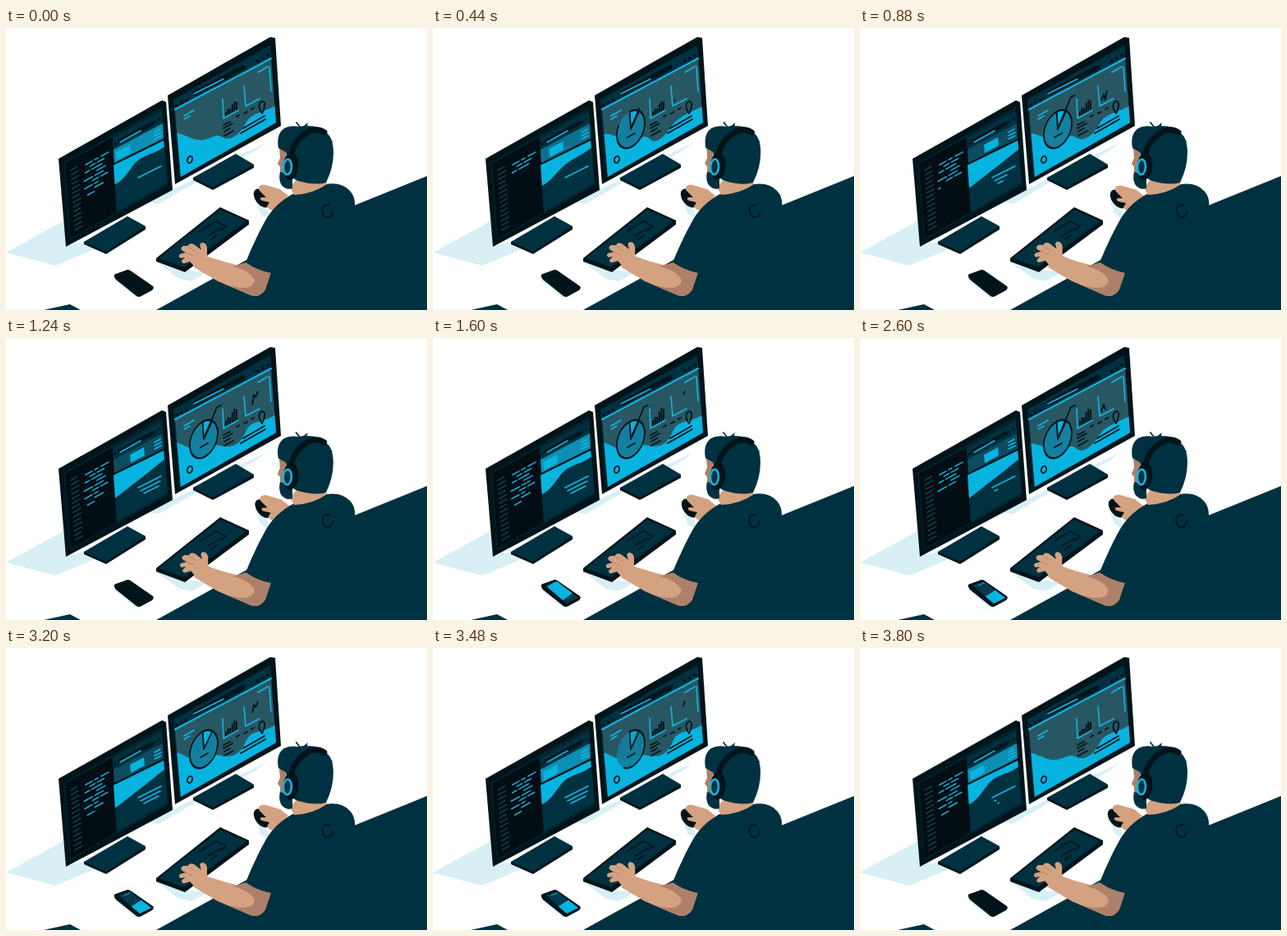
Recreate the animation shown at these times as an HTML page. Size 513x343 px, loop 3840 ms.

```html
<!DOCTYPE html>
<html lang="en">
<head>
<meta charset="utf-8">
<title>Desk scene</title>
<style>
html, body { margin: 0; width: 100%; height: 100%; overflow: hidden; background: #fff; }
svg { display: block; width: 100vw; height: 100vh; }
.navy { fill: #003140; }
.dark { fill: #01141a; }
.slate { fill: #285764; }
.cyan { fill: #07b3df; }
.pale { fill: #d7eff5; }
.skin { fill: #d4a281; }
.shade { fill: #ae806a; }
.ln { fill: none; stroke: #02161d; stroke-width: 1.8; stroke-linecap: round; stroke-linejoin: round; }
.lc { stroke: #12b4e0; stroke-width: 1.6; }
</style>
</head>
<body>
<svg viewBox="0 0 513 343" preserveAspectRatio="none">
  <defs>
    <clipPath id="webClip"><path d="M131 166L192 136L197 188L135 224Z"/></clipPath>
    <clipPath id="dashClip"><path d="M206 99L323 37L329 115L213 181Z"/></clipPath>
    <clipPath id="phoneClip"><path d="M137 301L151 296L177 316L163 323Z"/></clipPath>
  </defs>

  <!-- desk and shadows -->
  <path class="pale" d="M0 273L70 235L76 264L96 260L108 269L60 289ZM174 212L206 195L229 184L233 187L186 214ZM282 156L316 140L304 149L288 158ZM305 212L319 222L320 233L310 226ZM180 282L216 294L246 297L226 308L211 305ZM131 306L137 303L167 325L158 328Z"/>
  <path class="navy" d="M513 180L424 216L315 270L183 343H513ZM46 343L78 336L91 343Z"/>

  <!-- left monitor -->
  <path class="dark" d="M95 260V263L122 275L170 245V241Z"/>
  <path class="navy" d="M95 260L148 229L170 241L122 272Z"/>
  <path class="dark" d="M64 159L190 88L195 90L203 197L73 266Z"/>
  <path fill="#05222c" d="M70 164L190 96L197 191L78 258Z"/>
  <path fill="#020e13" d="M72 165L130 133L135 224L79 256Z"/>
  <path class="navy" d="M130 134L190 101L191 116L131 148Z"/>
  <path class="ln" style="stroke-width:5" d="M138 138L178 116"/>
  <path class="ln lc" d="M139 139L164 125"/>
  <g class="dark"><circle cx="133" cy="141" r="1.5"/><circle cx="182" cy="114" r="1.5"/><circle cx="187" cy="111" r="1.5"/></g>
  <path fill="#0d4b60" d="M131 148L191 116L192 134L132 164Z"/>
  <path id="hero" fill="#0b8fb4" d="M131 148L191 116L192 134L132 164Z"/>
  <path id="card" class="cyan" d="M134 151L151 142L152 152L135 161Z"/>
  <path class="ln lc" d="M181 127L188 123M181 131L189 127M181 135L189 131"/>
  <g clip-path="url(#webClip)">
    <path class="navy" d="M130 130H200V226H130Z"/>
    <path id="webWave" class="cyan"/>
    <g id="webText" class="ln lc"></g>
  </g>
  <path class="ln" d="M131 166L192 136"/>
  <g id="side" transform="matrix(1 -.55 .07 1 79 173)" class="ln" style="stroke:#194450;stroke-width:1.5"></g>
  <g id="code" transform="matrix(1 -.55 .07 1 94 168)" class="ln lc"></g>

  <!-- right monitor -->
  <path class="dark" d="M228 182V185L252 197L302 170V166Z"/>
  <path class="navy" d="M228 182L280 153L302 166L252 194Z"/>
  <path class="dark" d="M197 82L322 11L328 12L335 119L206 190Z"/>
  <path class="navy" d="M204 87L322 21L329 116L212 182Z"/>
  <path class="slate" d="M206 99L323 37L329 115L213 181Z"/>
  <path class="ln" style="stroke-width:6" d="M231 79L289 48"/>
  <path class="ln lc" d="M229 80L265 62"/>
  <g class="dark"><circle cx="208" cy="94" r="2"/><circle cx="214" cy="91" r="2"/><circle cx="220" cy="88" r="2"/><circle cx="307" cy="40" r="2"/><circle cx="313" cy="37" r="2"/><circle cx="319" cy="33" r="2"/></g>
  <g clip-path="url(#dashClip)"><path id="wave" class="cyan"/></g>
  <path class="ln lc" style="stroke-width:2" d="M206 99L323 37"/>
  <path class="ln lc" d="M217 107L229 100M217 111L224 107M307 54L319 47"/>
  <path class="ln lc" d="M264 86L265 110L283 100M290 71L292 95L309 86M321 47L323 77"/>
  <g id="bars" class="ln" style="stroke-width:2;stroke-linecap:butt"></g>
  <path id="trace" class="ln" d="M294 89L297 81L299 87L302 69L304 72L307 65" stroke-dasharray="24 200"/>
  <path class="ln" d="M265 118L273 114M265 122L276 116M266 126L273 122M266 131L277 125M281 108L284 106M290 104L294 102M299 99L302 97M286 128L316 111M289 122L315 107"/>
  <path class="ln" d="M312 104Q307 97 309 92Q312 87 315 91Q316 96 312 104Z"/>
  <ellipse class="ln" cx="224" cy="160" rx="3" ry="4.2" transform="rotate(20 224 160)"/>
  <g id="pie">
    <g transform="matrix(1 -.54 .08 1.25 241 123)">
      <circle r="17" fill="#147f9f"/>
      <path id="slice" class="cyan"/>
      <circle id="ring" class="ln" r="17" pathLength="100" stroke-dasharray="100" transform="rotate(-90)"/>
      <path class="ln" d="M0 -17V0L11 -12"/>
    </g>
    <path class="ln" d="M237 133L246 128"/>
  </g>
  <path id="pointer" class="ln" d="M241 122L257 84L262 82" pathLength="100"/>

  <!-- keyboard and phone -->
  <path class="dark" d="M183 280L261 218L296 234V239L218 297L183 284Z"/>
  <path class="navy" d="M186 280L261 221L293 235L217 291Z"/>
  <path class="ln" d="M237 247L256 235L268 241L262 246M246 253L261 244M250 257L257 252"/>
  <path class="dark" d="M132 302Q131 300 134 299L148 294Q151 294 153 296L179 314Q181 316 178 319L165 326Q162 328 159 326L134 306Q132 304 132 302Z"/>
  <g id="phone" clip-path="url(#phoneClip)">
    <path fill="#04384a" d="M136 294H180V326H136Z"/>
    <path id="page" class="cyan" d="M124 304L146 290L164 306L146 319Z"/>
    <path class="ln lc" style="stroke-width:1" d="M144 301L151 298"/>
  </g>

  <!-- person -->
  <g id="mouse">
    <ellipse class="dark" cx="312" cy="207" rx="8" ry="13" transform="rotate(-38 312 207)"/>
    <path class="skin" d="M309 192Q313 189 320 192L334 196L344 204L326 222Q319 221 318 217L321 212L312 210Q308 208 311 206L317 206L311 200Q306 196 309 192Z"/>
  </g>
  <g id="arm">
    <path class="skin" d="M239 276L265 284L292 291L323 297L317 317Q309 329 298 325L258 308L229 291Z"/>
    <path class="shade" d="M276 290L293 285L323 297L317 317Q309 329 298 325L268 312Q300 322 303 307Q298 295 276 290Z"/>
    <g id="hand">
      <path class="skin" d="M245 278L245 267Q244 261 239 261Q235 262 237 267L238 270L229 263Q223 261 222 265L216 265Q211 268 215 271L219 273L212 275Q209 278 213 280L218 279L214 283Q214 287 218 286L224 284L231 292L243 295L253 282Z"/>
      <path class="ln" style="stroke:#ae806a;stroke-width:.8" d="M223 267L231 272M219 273L228 277"/>
    </g>
  </g>
  <g id="body">
    <path class="navy" d="M351 201Q370 203 390 190Q409 187 419 198Q426 205 425 218L420 330L312 330L323 298Q306 295 292 285Q303 258 314 238Q326 214 351 201Z"/>
    <path class="ln" style="stroke-width:2" d="M386 217Q384 227 390 230Q397 231 398 223M388 216L394 215"/>
  </g>
  <g id="head">
    <path class="skin" d="M346 194L351 203Q374 202 391 190L388 182L356 182Z"/>
    <path class="shade" d="M333 145L340 143L345 181H334L334 169L331 165L334 158Z"/>
    <path class="navy" d="M334 175Q343 177 349 183L349 195Q341 198 335 190Q332 183 334 175Z"/>
    <path class="navy" d="M332 146Q329 129 339 122Q346 118 357 120L363 119L368 115L367 119Q384 119 391 128Q399 134 399 152Q399 170 390 188Q377 192 356 186Q347 184 347 173L341 151Z"/>
    <path class="ln" style="stroke:#003140" d="M358 120L354 115M392 136L397 138"/>
    <path class="ln" style="stroke:#01141a;stroke-width:7" d="M347 158Q350 136 369 126Q380 121 388 127"/>
    <ellipse class="dark" cx="347" cy="168" rx="9.5" ry="16.5" transform="rotate(5 347 168)"/>
    <ellipse cx="343" cy="169" rx="5" ry="9.3" fill="#01303f" stroke="#12b4e0" stroke-width="2.6" transform="rotate(3 343 169)"/>
  </g>
</svg>
<script>
const LOOP = 3840, HALF = LOOP / 2, STEP = 40;
const $ = id => document.getElementById(id);
const set = (id, name, value) => $(id).setAttribute(name, value);
const clamp = x => Math.max(0, Math.min(1, x));
const ramp = (t, a, b) => clamp((t - a) / (b - a));
const ease = (t, a, b) => { const x = ramp(t, a, b); return x * x * (3 - 2 * x); };
const mix = (a, b, k) => a + (b - a) * k;

function addLine(parent, d = "") {
  const p = document.createElementNS("http://www.w3.org/2000/svg", "path");
  p.setAttribute("d", d);
  $(parent).append(p);
  return p;
}

for (let i = 0; i < 14; i++) addLine("side", `M0 ${i * 5.6}h${i % 3 ? 9 : 8}`);

// Code rows: start and length of each dash
const rows = [
  [[3, 8], [14, 4], [22, 9]], [[8, 6], [17, 8]], [[2, 5], [10, 12]], [[16, 10]],
  [[0, 10], [13, 10]], [[10, 7], [20, 8]], [[0, 9], [12, 4]], [[12, 10]], [[3, 8]]
];
const code = rows.flatMap((row, i) => row.map(([x, w]) => ({ x, w, y: i * 4.6, row: i, el: addLine("code") })));
const bars = [5, 7, 6, 10, 12, 10].map((h, i) => ({ h, x: 268 + i * 2.6, y: 107 - i * 1.4, el: addLine("bars") }));
const texts = [[161, 182, 28], [164, 186, 24], [168, 189, 18]].map(([x, y, w]) => ({ x, y, w, el: addLine("webText") }));

function drawSite(u) {
  const k = ease(u, 340, 560) * (1 - ease(u, 1380, 1560));
  const m = (a, b) => mix(a, b, k).toFixed(2);
  set("webWave", "d", `M130 130V${m(191, 197)}C146 ${m(187, 185)} 152 ${m(165, 180)} 165 ${m(158, 170)}S185 ${m(152, 154)} 198 ${m(140, 144)}V130Z`);
  set("hero", "opacity", 1 - k);
  set("card", "transform", `translate(${17 * k} ${-9 * k})`);
  texts.forEach(({ x, y, w, el }, i) => {
    const grow = ease(u, 420 + i * 110, 1000 + i * 130) * (1 - ease(u, 1780, 1900));
    const len = w * (i ? grow : 1);
    el.setAttribute("d", len > .5 ? `M${x} ${y}l${len} ${-len * .5}` : "");
  });
}

function drawCode(u) {
  const typed = u < 300 ? rows.length : mix(2, rows.length, ramp(u, 300, 1300));
  code.forEach(({ x, w, y, row, el }) => {
    const len = Math.min(w, (typed - row) * 32 - x);
    el.setAttribute("d", len > 0 ? `M${x} ${y}h${len}` : "");
  });
}

function drawDash(t, u) {
  const s = Math.sin(u / HALF * Math.PI * 2) * 2;
  set("wave", "d", `M204 ${127 + s}C220 ${129 - s} 228 ${138 - s} 240 ${136 + s}S255 ${128 - s} 264 ${133 + s}S285 ${130 - s} 292 ${116 + s}S314 ${104 - s} 332 ${92 + s}V190H204Z`);
  const tall = 1 + .4 * Math.sin(t / LOOP * Math.PI) ** 2;
  bars.forEach(({ h, x, y, el }) => el.setAttribute("d", `M${x} ${y}v${-h * tall}`));
  set("trace", "stroke-dashoffset", 24 - ramp(u, 420, 1800) * 76);
  $("trace").style.opacity = u > 430 && u < 1790 ? 1 : 0;

  const show = ease(t, 80, 560) * (1 - ease(t, 3340, 3660));
  set("pie", "opacity", clamp(show * 1.5));
  set("ring", "stroke-dashoffset", 100 - 100 * show);
  const a = .85 * show, r = 16;
  set("slice", "d", `M0 0V${-r}A${r} ${r} 0 0 1 ${r * Math.sin(a)} ${-r * Math.cos(a)}Z`);
  const line = ease(t, 300, 560) * (1 - ease(t, 2700, 3000));
  set("pointer", "stroke-dasharray", `${100 * line} 200`);
  $("pointer").style.opacity = line > .01 ? 1 : 0;
}

function drawPerson(t) {
  const tap = Math.abs(Math.sin(t / 160 * Math.PI));
  set("hand", "transform", `translate(${1.6 * tap} ${-tap})`);
  set("arm", "transform", `rotate(${.15 * tap} 310 305)`);
  const push = ease(t, 450, 800) * (1 - ease(t, 1050, 1450));
  const rest = ease(t, 1400, 1600) * (1 - ease(t, 2700, 3100));
  set("mouse", "transform", `translate(${3 * push + rest} ${push})`);
  const breath = Math.sin(ramp(t, 0, 2800) * Math.PI * 2) * .2;
  set("body", "transform", `rotate(${breath} 350 330)`);
  const nod = Math.sin(ramp(t, 0, 3360) * Math.PI * 4) * .3;
  set("head", "transform", `rotate(${nod} 370 195)`);
}

function draw(t) {
  const u = t % HALF;
  drawSite(u);
  drawCode(u);
  drawDash(t, u);
  drawPerson(t);
  set("phone", "opacity", ease(t, 1240, 1400) * (1 - ease(t, 3480, 3640)));
  const slide = ease(t, 1680, 2000);
  set("page", "transform", `translate(${8 + 15 * slide} ${3 + 11 * slide})`);
}

const start = performance.now();
function tick(now) {
  const t = Math.max(0, now - start) % LOOP;
  draw(Math.floor(t / STEP) * STEP);
  requestAnimationFrame(tick);
}
draw(0);
requestAnimationFrame(tick);
</script>
</body>
</html>
```
